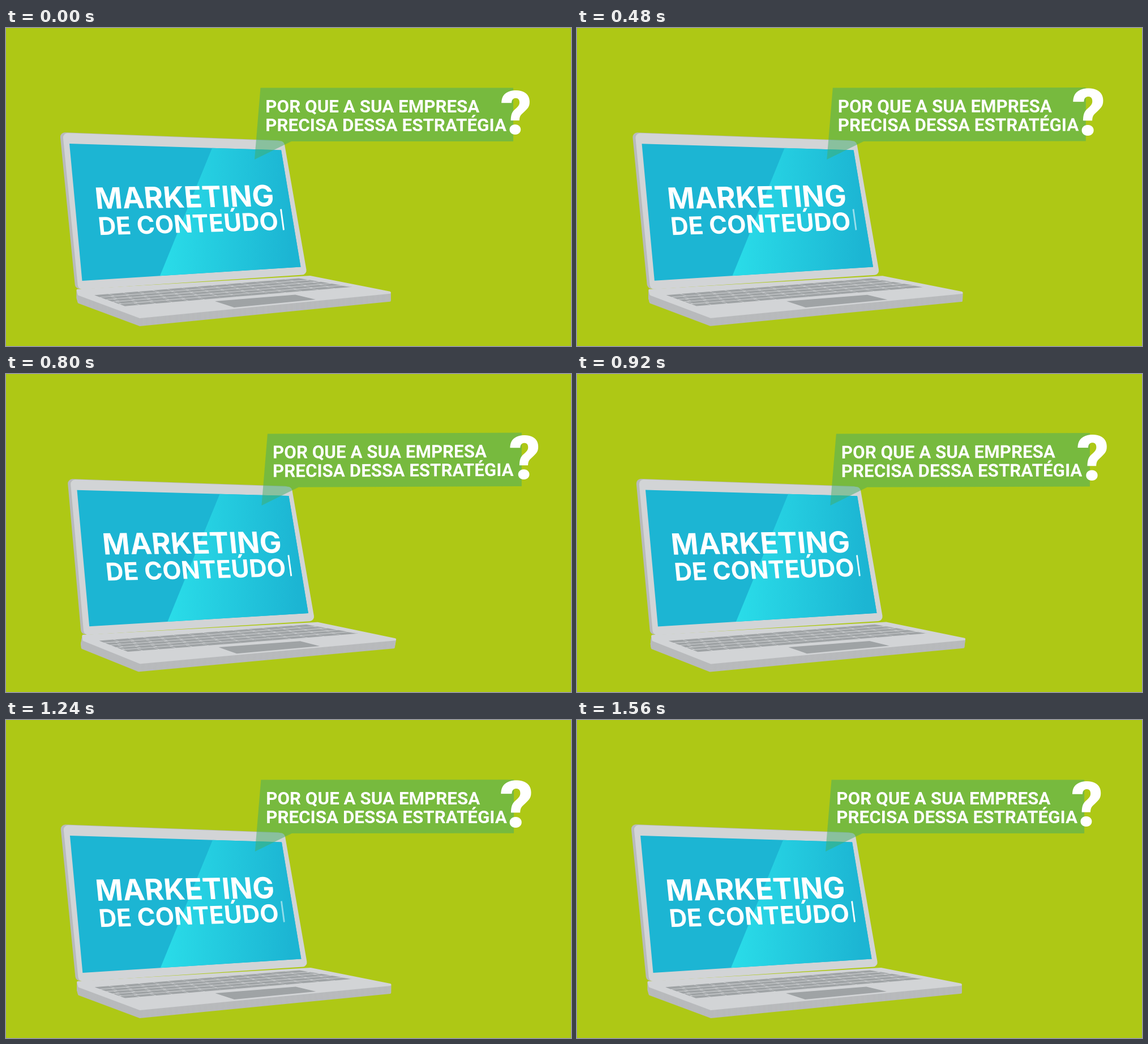
Write an HTML page with a canvas that moves like this. It is 998 px wide and 561 px high and loops after 1600 ms.

```html
<!DOCTYPE html>
<html lang="pt">
<head>
<meta charset="utf-8">
<style>
  html, body { margin: 0; width: 100%; height: 100%; overflow: hidden; background: #aec815; }
  canvas { display: block; }
</style>
</head>
<body>
<canvas id="stage" width="998" height="561"></canvas>
<script>
const ctx = document.getElementById('stage').getContext('2d');
const LOOP = 1600, STEP = 40;
const LIGHT = '#d2d4d6', DARK = '#b8babc', KEY = '#9fa3a5', SCREEN_BLUE = '#1cb5d3';

// Corners run clockwise from the back or top left.
const LID = [[100, 185], [491, 199.5], [532, 435], [127.5, 461.5]];
const SCREEN = [[112, 204], [486, 215.5], [520.5, 421.5], [134.5, 446]];
const KEYBOARD = [[155, 471], [517, 441], [614, 457], [211, 491]];
const TOUCHPAD = [[369, 482], [511, 470.5], [547, 479], [403, 493]];
const BASE = [[124, 461], [537, 437], [691.5, 467.5], [236, 512], [127, 471.5]];
const BUBBLE = [[449.5, 105.5], [896, 105.5], [896, 200], [504, 200], [439, 232]];

const mix = (a, b, u) => a + (b - a) * u;

function inQuad([a, b, c, d], u, v) {
  return [0, 1].map(k => mix(mix(a[k], b[k], u), mix(d[k], c[k], u), v));
}

function subQuad(quad, u0, v0, u1, v1) {
  return [[u0, v0], [u1, v0], [u1, v1], [u0, v1]].map(([u, v]) => inQuad(quad, u, v));
}

const shift = (points, dx, dy) => points.map(([x, y]) => [x + dx, y + dy]);

// The turn swings outward along an S-curve and returns the same way.
const turnAt = ms => 2 / (1 + Math.exp((680 - ms) / 110));

// The back of the laptop moves right while its front corner stays put.
function warpLaptop([x, y], p) {
  const depth = Math.max(0, (y - 440) / 85);
  return [
    x + (9 - 10 * depth ** 1.1) * p,
    y + 0.6 * (x - 350) / 250 * (y - 320) / 125 * p
  ];
}

function warpBubble([x, y], p) {
  const u = (x - 440) / 450;
  return [x + (8.3 + 1.6 * u) * p, y - 1.4 * u * p];
}

function fillShape(points, fill, radius = 0) {
  const n = points.length, last = points[n - 1];
  ctx.beginPath();
  ctx.moveTo(mix(last[0], points[0][0], 0.5), mix(last[1], points[0][1], 0.5));
  points.forEach(([x, y], i) => ctx.arcTo(x, y, ...points[(i + 1) % n], radius));
  ctx.closePath();
  ctx.fillStyle = fill;
  ctx.fill();
}

function laptopPart(points, p, fill, radius) {
  fillShape(points.map(point => warpLaptop(point, p)), fill, radius);
}

function label(text, font, x, y, slope = 0, skew = 0) {
  ctx.save();
  ctx.transform(1, slope, skew, 1, x, y);
  ctx.font = font;
  ctx.fillStyle = '#fff';
  ctx.fillText(text, 0, 0);
  ctx.restore();
}

function drawKeyboard(p) {
  const rows = 5, cols = 14, gap = 0.018;
  for (let r = 0; r < rows; r++) {
    const stagger = r * 0.27 % 1;
    const edge = c => Math.min(1, Math.max(0, (c - stagger) / cols));
    const isSpaceBar = c => r === rows - 1 && c > 4 && c < 9;
    for (let c = 0; c <= cols; c++) {
      const end = edge(c + 1) - (isSpaceBar(c) ? 0 : 0.004);
      if (end <= edge(c)) continue;
      laptopPart(subQuad(KEYBOARD, edge(c), r / rows + gap, end, (r + 1) / rows - gap), p, KEY);
    }
  }
}

function drawBase(p) {
  for (let drop = 14; drop > 0; drop--) laptopPart(shift(BASE, 0, drop), p, DARK, 2);
  laptopPart(BASE, p, LIGHT, 2);
  drawKeyboard(p);
  laptopPart(TOUCHPAD, p, KEY);
}

function drawLid(p) {
  laptopPart(shift(LID, -5, -1), p, DARK, 8);
  laptopPart(LID, p, LIGHT, 8);
  laptopPart(SCREEN, p, SCREEN_BLUE);

  const [top, right, corner] = subQuad(SCREEN, 0.674, 0, 1, 1);
  const bottom = inQuad(SCREEN, 0.356, 1);
  const shine = ctx.createLinearGradient(bottom[0] + 9 * p, 0, 502 + 9 * p, 0);
  shine.addColorStop(0, '#2adde9');
  shine.addColorStop(1, SCREEN_BLUE);
  laptopPart([top, right, corner, bottom], p, shine);
}

function drawScreenText(p, pulse) {
  const x = 8.9 * p, lift = 0.003 * p;
  label('MARKETING', '700 51.6px Inter, sans-serif', 159 + x, 319 - 0.3 * p, lift - 0.015, 0.1);
  label('DE CONTEÚDO', '700 43.3px Inter, sans-serif', 164.5 + x, 365.3 - 0.5 * p, lift - 0.028, 0.1);
  ctx.strokeStyle = `rgba(255,255,255,${1 - 0.5 * pulse ** 2})`;
  ctx.lineWidth = 2.8;
  ctx.beginPath();
  ctx.moveTo(485.5 + x, 319.5);
  ctx.lineTo(490.5 + x, 356.5);
  ctx.stroke();
}

function drawBubble(p, pulse) {
  fillShape(BUBBLE.map(point => warpBubble(point, p)), 'rgba(66,174,104,0.5)');
  ['POR QUE A SUA EMPRESA', 'PRECISA DESSA ESTRATÉGIA'].forEach((line, i) =>
    label(line, '700 31.35px Roboto, sans-serif', 458.3 + 8.5 * p, 149 + 33 * i - 0.1 * p, -0.0031 * p));

  const grow = 1 + 0.072 * pulse;
  ctx.save();
  ctx.translate(901 + 10.2 * p, 149 - 0.9 * p);
  ctx.scale(grow, grow);
  ctx.textAlign = 'center';
  label('?', '900 108px Roboto, sans-serif', 0, 37.8);
  ctx.restore();
}

function draw(ms) {
  const half = Math.min(ms, LOOP - ms);
  const p = turnAt(half), pulse = Math.sin(Math.PI * half / 800);
  ctx.fillStyle = '#aec815';
  ctx.fillRect(0, 0, 998, 561);
  drawBase(p);
  drawLid(p);
  drawScreenText(p, pulse);
  drawBubble(p, pulse);
}

const start = performance.now();
function tick() {
  const ms = (performance.now() - start) % LOOP;
  draw(Math.floor(ms / STEP) * STEP);
  requestAnimationFrame(tick);
}
tick();
</script>
</body>
</html>
```
